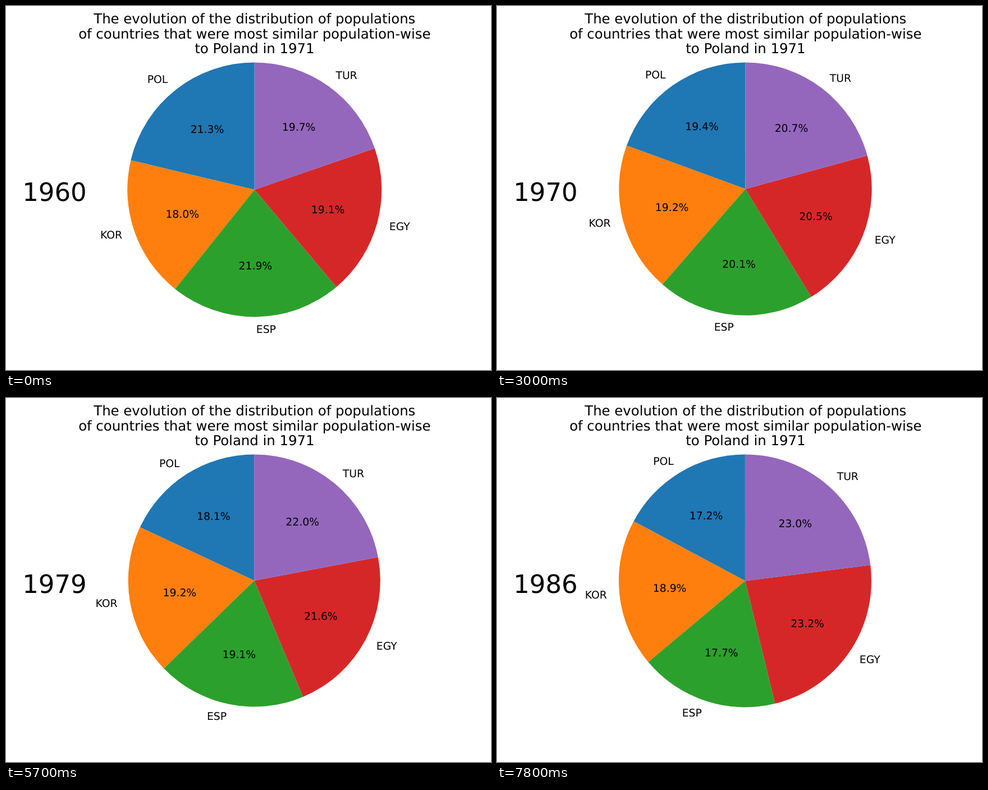
An HTML page that plays this animation: 864 by 648 pixels, repeating every 8000 ms.

```html
<!DOCTYPE html>
<html lang="en">
<head>
<meta charset="utf-8">
<title>Population shares</title>
<style>
  html, body { margin: 0; width: 100%; height: 100%; overflow: hidden; background: #fff; }
  svg { display: block; width: 864px; height: 648px; }
  text {
    font-family: "DejaVu Sans", sans-serif; font-size: 18.75px; fill: #000;
    text-rendering: geometricPrecision;
  }
  .title { font-size: 24.375px; text-anchor: middle; }
  .year { font-size: 45px; }
  .pct { text-anchor: middle; }
</style>
</head>
<body>
<svg id="chart" viewBox="0 0 864 648">
  <text class="title" x="442.8" y="31">The evolution of the distribution of populations</text>
  <text class="title" x="442.8" y="58">of countries that were most similar population-wise</text>
  <text class="title" x="442.8" y="84">to Poland in 1971</text>
</svg>
<script>
const STEP = 300, LOOP = 8000;
const TAU = Math.PI * 2;

// Population in millions at a few key years, smoothly joined in between
const keyYears = [1960, 1966, 1970, 1975, 1979, 1984, 1986];
const countries = [
  { name: 'POL', color: '#1f77b4', pop: [29.64, 31.68, 32.66, 34.02, 35.25, 36.90, 37.46] },
  { name: 'KOR', color: '#ff7f0e', pop: [25.01, 29.44, 32.24, 35.28, 37.53, 40.41, 41.21] },
  { name: 'ESP', color: '#2ca02c', pop: [30.46, 32.28, 33.81, 35.76, 37.19, 38.33, 38.58] },
  { name: 'EGY', color: '#d62728', pop: [26.63, 31.23, 34.51, 38.55, 42.26, 48.10, 50.52] },
  { name: 'TUR', color: '#9467bd', pop: [27.47, 31.72, 34.88, 39.28, 42.99, 48.15, 50.13] }
];
const firstYear = keyYears[0], lastYear = keyYears[keyYears.length - 1];

const svg = document.getElementById('chart');
function add(tag, attrs) {
  const el = document.createElementNS('http://www.w3.org/2000/svg', tag);
  for (const key in attrs) el.setAttribute(key, attrs[key]);
  return svg.appendChild(el);
}

for (const c of countries) c.wedge = add('path', { fill: c.color });
for (const c of countries) {
  c.label = add('text', {});
  c.label.textContent = c.name;
  c.pct = add('text', { class: 'pct' });
}
const yearText = add('text', { class: 'year', x: 29.2, y: 347 });

// Cubic Hermite curve through the key years
function popAt(pop, year) {
  const last = keyYears.length - 1;
  let i = 0;
  while (i < last - 1 && keyYears[i + 1] <= year) i++;
  const slope = j => {
    const a = Math.max(0, j - 1), b = Math.min(last, j + 1);
    return (pop[b] - pop[a]) / (keyYears[b] - keyYears[a]);
  };
  const span = keyYears[i + 1] - keyYears[i];
  const u = (year - keyYears[i]) / span, v = 1 - u;
  return v * v * ((1 + 2 * u) * pop[i] + u * span * slope(i)) +
         u * u * ((1 + 2 * v) * pop[i + 1] - v * span * slope(i + 1));
}

// Angles run counter-clockwise from the top
function slices(year) {
  const values = countries.map(c => popAt(c.pop, year));
  const total = values.reduce((sum, v) => sum + v);
  let from = TAU / 4;
  return countries.map((c, i) => {
    const share = values[i] / total;
    const slice = { c, share, from, to: from + share * TAU };
    from = slice.to;
    return slice;
  });
}

// The plot is scaled to the Bezier control points of the arcs, two curves per slice
function fit(list) {
  const xs = [0], ys = [0];
  for (const { from, to } of list) {
    const d = (to - from) / 2;
    const k = Math.sin(d) * (Math.sqrt(4 + 3 * Math.tan(d / 2) ** 2) - 1) / 3;
    for (const [a, s] of [[from, k], [from + d, -k], [from + d, k], [to, -k]]) {
      xs.push(Math.cos(a) - s * Math.sin(a));
      ys.push(Math.sin(a) + s * Math.cos(a));
    }
  }
  const top = Math.max(...ys);
  const r = 453.6 / (top - Math.min(...ys));
  return {
    r,
    cx: 442.8 - r * (Math.min(...xs) + Math.max(...xs)) / 2,
    cy: 100.44 + r * top
  };
}

// Centres a text on y, with its baseline on a whole pixel
function place(el, [x, y]) {
  el.setAttribute('x', x.toFixed(2));
  el.setAttribute('y', Math.round(y + 5.9));
}

function draw(year) {
  const list = slices(year);
  const { r, cx, cy } = fit(list);
  const at = (angle, k) => [cx + k * r * Math.cos(angle), cy - k * r * Math.sin(angle)];
  for (const { c, share, from, to } of list) {
    const mid = (from + to) / 2;
    c.wedge.setAttribute('d', `M${cx},${cy}L${at(from, 1)}A${r},${r} 0 0 0 ${at(to, 1)}Z`);
    place(c.label, at(mid, 1.1));
    c.label.setAttribute('text-anchor', Math.cos(mid) > 0 ? 'start' : 'end');
    place(c.pct, at(mid, 0.6));
    c.pct.textContent = (share * 100).toFixed(1) + '%';
  }
  yearText.textContent = year;
}

const start = performance.now();
let shown;
function tick() {
  const t = (performance.now() - start) % LOOP;
  const year = Math.min(lastYear, firstYear + Math.floor(t / STEP));
  if (year !== shown) draw(shown = year);
  requestAnimationFrame(tick);
}
tick();
</script>
</body>
</html>
```
